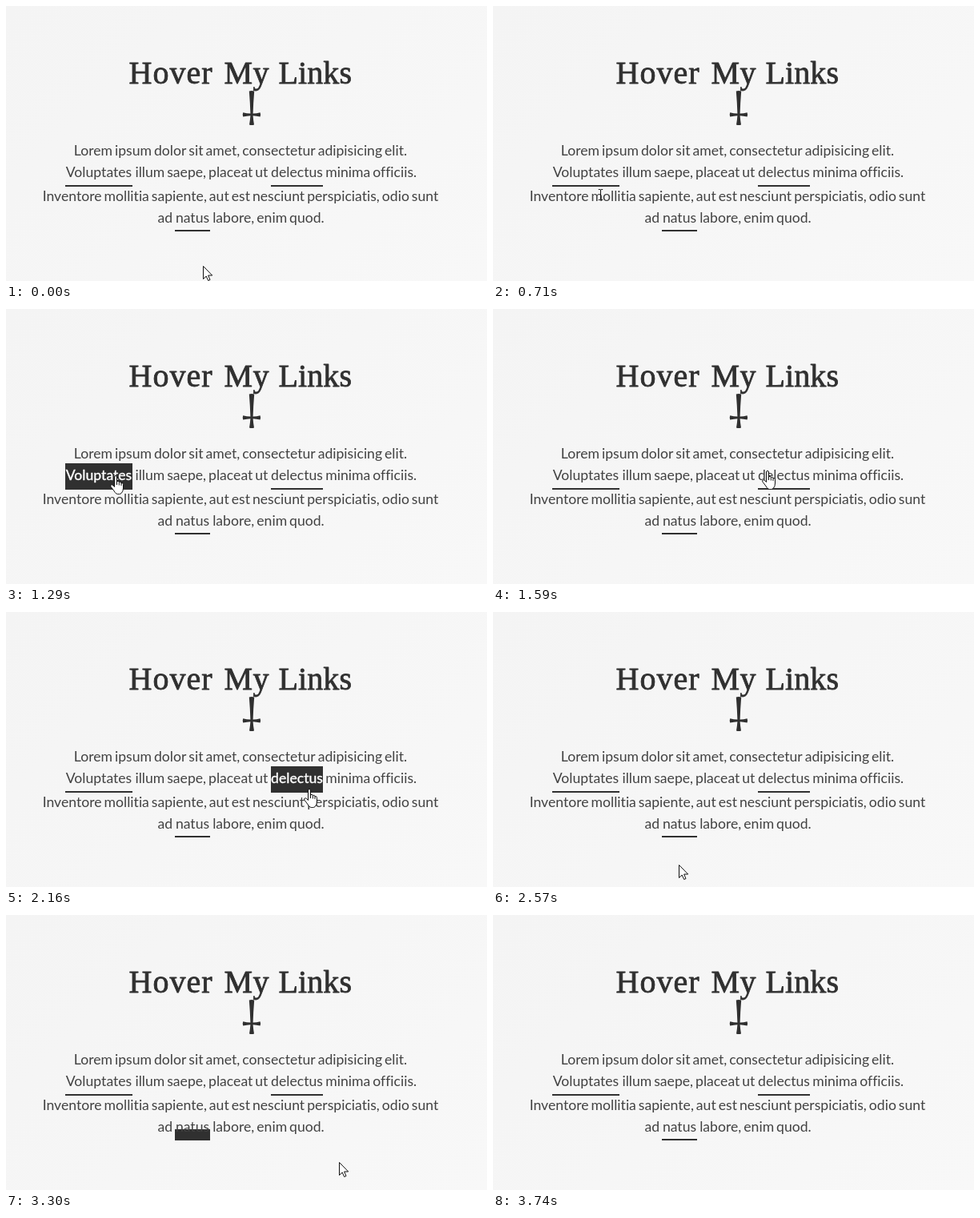
Animation of 601x344 px, one loop 4.01 s. Source, as an HTML page with a canvas:

```html
<!DOCTYPE html>
<html lang="en">
<head>
<meta charset="utf-8">
<title>Hover My Links</title>
<style>
html, body { margin: 0; width: 601px; height: 344px; overflow: hidden; background: #f6f6f6; }
canvas { display: block; }
</style>
</head>
<body>
<canvas id="stage" width="601" height="344"></canvas>
<script>
const ctx = document.getElementById('stage').getContext('2d');
const LOOP = 4010;
const INK = '#303030';
const TEXT = '#424242';
const PINK = '#ff10c4';
const BODY = '17.6px Lato, sans-serif';
const TITLE = '40px "Liberation Serif", serif';

// Pointer stops: time, shape, left, top
const STOPS = [
  [0, 'arrow', 246, 325], [130, 'arrow', 207, 305], [280, 'arrow', 148, 256],
  [430, 'beam', 138, 243], [560, 'beam', 136, 238], [710, 'beam', 131, 228],
  [860, 'hand', 129, 213], [1010, 'hand', 129, 210], [1140, 'hand', 130, 209],
  [1290, 'hand', 130, 208], [1440, 'beam', 239, 198], [1590, 'hand', 336, 202],
  [1720, 'hand', 352, 207], [1870, 'hand', 364, 214], [2020, 'hand', 370, 219],
  [2160, 'hand', 372, 221], [2310, 'arrow', 479, 266], [2440, 'arrow', 378, 312],
  [2570, 'arrow', 232, 316], [2720, 'arrow', 245, 284], [2870, 'hand', 238, 273],
  [3020, 'hand', 237, 271], [3150, 'hand', 238, 271], [3300, 'arrow', 416, 309],
  [3450, 'arrow', 473, 325], [3610, 'arrow', 505, 338], [3740, 'none', 0, 0]
];

const LINKS = [
  { text: 'Voluptates', x: 74, y: 193, w: 84, h: 33, base: 214, on: 800, off: 1350 },
  { text: 'delectus', x: 331, y: 193, w: 65, h: 33, base: 214, on: 1600, off: 2250 },
  { text: 'natus', x: 211, y: 250, w: 44, h: 32, base: 271, on: 2810, off: 3180 }
];

const ARROW = new Path2D('M.5.5V16.5L4.2 13L6.7 18.5L9 17.5L6.6 12H11.7Z');
const HAND = new Path2D('M5.5 14.5V2Q5.5.5 7 .5Q8.5.5 8.5 2V8Q8.7 7.2 10 7.3Q11.3 7.5 11.3 8.8' +
  'Q12 8 13 8.3Q14 8.6 14 10Q15 9.3 16 10Q16.5 10.4 16.5 11.5V16Q16.5 20 14.2 22.4' +
  'Q13 23.5 11.5 23.5H9.5Q7.6 23.5 6.4 21.6Q4 18 .9 14.2Q.2 12.8 1.3 12Q2.6 11.4 3.9 12.7Z');
const FINGERS = new Path2D('M8.5 8V12M11.3 9V12.5M14 10V13');
const BEAM = new Path2D('M.8 1.5H2.6Q3.5 1.5 3.5 2.4Q3.5 1.5 4.4 1.5H6.2M3.5 2V14' +
  'M.8 14.5H2.6Q3.5 14.5 3.5 13.6Q3.5 14.5 4.4 14.5H6.2');
const CROSS = new Path2D('M303.8 106.5Q307 105.6 310.2 106.5Q309 121 308.6 134.5' +
  'Q313 134.4 317.6 133.2Q318.6 136 317.6 138.6Q313 137.4 308.6 137.3Q309 143 310 148.5' +
  'Q307 149.6 304 148.5Q305 143 305.4 137.3Q301 137.4 296.2 138.6Q295.2 136 296.2 133.2' +
  'Q301 134.4 305.4 134.5Q305 121 303.8 106.5Z');

const clamp = v => Math.max(0, Math.min(1, v));

const backdrop = ctx.createLinearGradient(64, -64, 537, 408);
backdrop.addColorStop(0, '#f4f4f4');
backdrop.addColorStop(1, '#f8f8f8');

function write(text, x, y, align = 'left', color = TEXT) {
  ctx.font = BODY;
  ctx.wordSpacing = '-1.55px';
  ctx.letterSpacing = '0.01px'; // keeps "ti" from joining
  ctx.fillStyle = color;
  ctx.textAlign = align;
  ctx.fillText(text, x, y);
}

function titleWord(text, x, spacing) {
  ctx.font = TITLE;
  ctx.textAlign = 'left';
  ctx.letterSpacing = spacing + 'px';
  ctx.fillStyle = ctx.strokeStyle = INK;
  ctx.lineWidth = 0.8;
  ctx.lineJoin = 'round';
  ctx.fillText(text, x, 97);
  ctx.strokeText(text, x, 97);
}

function drawLink(link, t) {
  const hovered = t >= link.on && t < link.off;
  const grow = clamp((t - link.on) / 200) - clamp((t - link.off) / 200);
  const height = 2 + (link.h - 2) * grow;
  const mid = link.x + link.w / 2;
  ctx.fillStyle = INK;
  ctx.fillRect(link.x, link.y + link.h - height, link.w, height);
  write(link.text, mid, link.base, 'center', hovered ? '#fff' : TEXT);
  if (hovered) {
    ctx.strokeStyle = '#fff';
    ctx.lineWidth = 0.4;
    ctx.strokeText(link.text, mid, link.base);
  }
}

// Each zigzag is drawn outwards, then wiped from its inner end
function drawBurst(link, t) {
  const age = t - link.on;
  const end = clamp((age - 105) / 100);
  const start = clamp((age - 245) / 205);
  if (end <= start) return;
  const step = 2.5, amp = 3.3, parts = 6;
  const length = parts * Math.hypot(step, 2 * amp);
  ctx.strokeStyle = PINK;
  ctx.lineWidth = 1.8;
  ctx.lineJoin = 'miter';
  ctx.setLineDash([(end - start) * length, length * 2]);
  ctx.lineDashOffset = -start * length;
  for (let k = 0; k < 8; k++) {
    const a = (7 + 45 * k) * Math.PI / 180;
    ctx.save();
    ctx.translate(link.x + link.w / 2 + link.w * Math.sin(a),
      link.y + link.h / 2 - 33 * Math.cos(a));
    ctx.rotate(a);
    ctx.beginPath();
    for (let i = 0; i <= parts; i++) {
      ctx.lineTo(i % 2 ? amp : -amp, (parts / 2 - i) * step);
    }
    ctx.stroke();
    ctx.restore();
  }
  ctx.setLineDash([]);
}

function drawPointer([, shape, x, y]) {
  if (shape === 'none') return;
  ctx.save();
  ctx.translate(x, y);
  ctx.lineWidth = 1;
  ctx.lineJoin = 'round';
  ctx.strokeStyle = '#111';
  ctx.fillStyle = '#fff';
  if (shape === 'beam') {
    ctx.stroke(BEAM);
  } else {
    const path = shape === 'hand' ? HAND : ARROW;
    ctx.fill(path);
    ctx.stroke(path);
    if (shape === 'hand') ctx.stroke(FINGERS);
  }
  ctx.restore();
}

function draw(now) {
  const time = now % LOOP;
  const stop = STOPS.filter(s => s[0] <= time).pop();
  const t = stop[0];
  ctx.fillStyle = backdrop;
  ctx.fillRect(0, 0, 601, 344);

  titleWord('Hover', 153.5, 1);
  titleWord('My', 272.5, 0.4);
  titleWord('Links', 340.5, 0.1);
  ctx.fillStyle = INK;
  ctx.fill(CROSS);

  write('Lorem ipsum dolor sit amet, consectetur adipisicing elit.', 293, 187, 'center');
  write('illum saepe, placeat ut', 161.4, 214);
  write('minima officiis.', 399.2, 214);
  write('Inventore mollitia sapiente, aut est nesciunt perspiciatis, odio sunt', 293, 244, 'center');
  write('ad', 189.5, 271);
  write('labore, enim quod.', 258.2, 271);

  LINKS.forEach(link => drawLink(link, t));
  LINKS.forEach(link => drawBurst(link, t));
  drawPointer(stop);
}

const begin = performance.now();
function tick() {
  draw(performance.now() - begin);
  requestAnimationFrame(tick);
}
tick();
</script>
</body>
</html>
```
